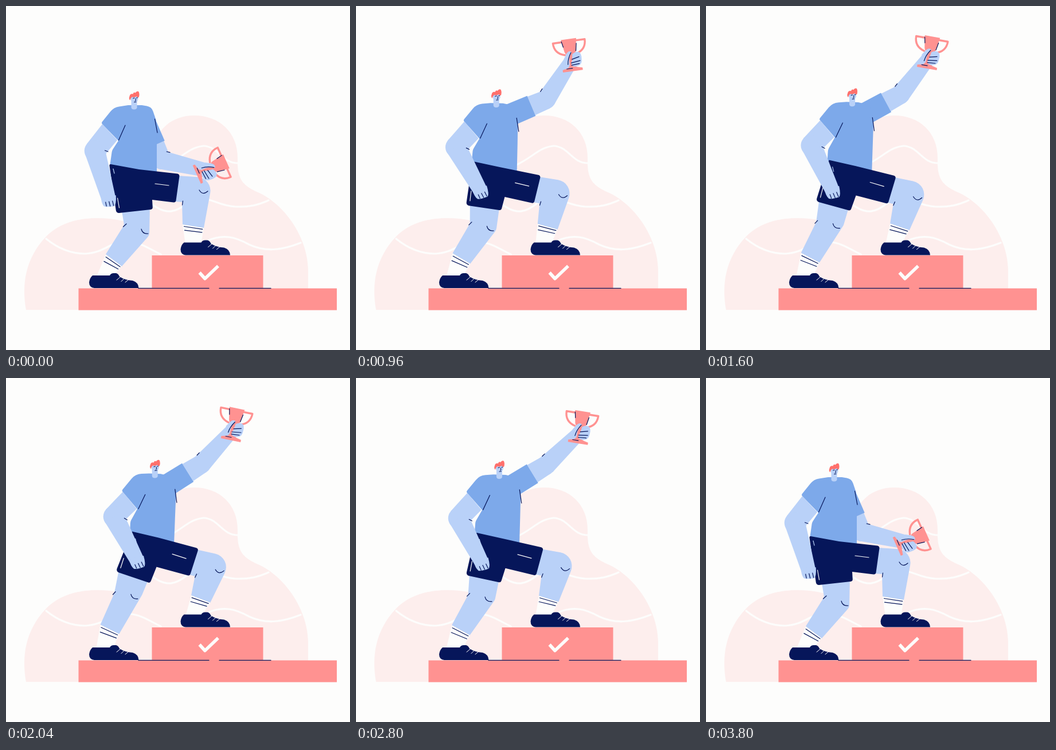
An HTML page with a canvas that plays this animation: 600 px wide and 600 px high, repeating every 3.84 s.

```html
<!DOCTYPE html>
<html lang="en">
<head>
<meta charset="utf-8">
<title>Winner</title>
<style>
html, body { margin: 0; width: 100%; height: 100%; overflow: hidden; background: #fdfdfc; }
canvas { display: block; width: 600px; height: 600px; }
</style>
</head>
<body>
<canvas id="stage" width="600" height="600"></canvas>
<script>
const ctx = document.getElementById('stage').getContext('2d');
const LOOP = 3840;
const WHITE = '#fdfdfc', BLUSH = '#fdeeed', CORAL = '#ff9291', HAIR = '#ff706c',
  NAVY = '#06165a', SKIN = '#b9d1f8', SHIRT = '#7da9ea';

// Key poses: lean 0..1, then angles in degrees
const times = [0, 560, 960, 1600, 2480, 2780, 3080, 3840];
const tracks = {
  lean:  [0, .1, .55, .82, 1, .72, .05, 0],
  upper: [66, 64, -23, -28.5, -34, -33, 67, 66],
  fore:  [13, 17.3, -57, -52.2, -44.5, -45, 15.7, 13],
  cup:   [66, 71, -8, 10, 12, 8, 73, 66],
  left:  [74, 74.6, 60.6, 65, 59, 62, 74, 74]
};

// Monotone cubic interpolation through the key poses
function sample(v, t) {
  const n = times.length;
  let i = 0;
  while (i < n - 2 && t >= times[i + 1]) i++;
  const slope = j => (v[j + 1] - v[j]) / (times[j + 1] - times[j]);
  const tangent = j => {
    if (j === 0 || j === n - 1) return 0;
    const a = slope(j - 1), b = slope(j);
    return a * b <= 0 ? 0 : 2 * a * b / (a + b);
  };
  const h = times[i + 1] - times[i], s = (t - times[i]) / h, s2 = s * s, s3 = s2 * s;
  return v[i] * (2 * s3 - 3 * s2 + 1) + v[i + 1] * (3 * s2 - 2 * s3) +
    h * (tangent(i) * (s3 - 2 * s2 + s) + tangent(i + 1) * (s3 - s2));
}

const mix = (a, b, k) => [a[0] + (b[0] - a[0]) * k, a[1] + (b[1] - a[1]) * k];
const polar = (o, deg, r) => {
  const a = deg * Math.PI / 180;
  return [o[0] + r * Math.cos(a), o[1] + r * Math.sin(a)];
};

// Polygon; a third value on a point is its corner radius
function poly(pts, color) {
  const n = pts.length;
  ctx.beginPath();
  ctx.moveTo(...mix(pts[n - 1], pts[0], .5));
  pts.forEach((p, i) => ctx.arcTo(p[0], p[1], ...mix(p, pts[(i + 1) % n], .5), p[2] || 0));
  ctx.closePath();
  ctx.fillStyle = color;
  ctx.fill();
}

function shape(d, color) {
  ctx.fillStyle = color;
  ctx.fill(new Path2D(d));
}

function stroke(d, color = NAVY, width = 1.2) {
  ctx.strokeStyle = color;
  ctx.lineWidth = width;
  ctx.stroke(new Path2D(d));
}

const line = (a, b, color, width) => stroke(`M${a}L${b}`, color, width);

function dot(c, r, color) {
  ctx.beginPath();
  ctx.arc(c[0], c[1], r, 0, 7);
  ctx.fillStyle = color;
  ctx.fill();
}

function limb(a, b, ra, rb, color) {
  const deg = Math.atan2(b[1] - a[1], b[0] - a[0]) * 180 / Math.PI;
  poly([polar(a, deg - 90, ra), polar(b, deg - 90, rb), polar(b, deg + 90, rb), polar(a, deg + 90, ra)], color);
}

function placed(x, y, deg, draw) {
  ctx.save();
  ctx.translate(x, y);
  ctx.rotate(deg * Math.PI / 180);
  draw();
  ctx.restore();
}

function backdrop() {
  ctx.fillStyle = WHITE;
  ctx.fillRect(0, 0, 600, 600);
  shape('M35 530C27 485 34 440 70 402C96 376 130 370 160 370C185 370 205 374 225 382' +
    'C245 350 244 300 254 258C260 215 290 191 328 191C372 191 404 220 404 265' +
    'C403 300 410 311 437 324C482 342 526 400 527 460V530Z', BLUSH);
  stroke('M70 406C92 424 115 432 138 432C175 430 180 410 212 411C238 413 250 424 270 433' +
    'M250 342C285 372 302 353 318 343C352 325 362 348 400 350C425 351 440 347 458 339' +
    'M280 277C308 264 320 246 345 244C372 246 376 274 405 274' +
    'M350 410C380 396 402 404 424 416C456 431 486 424 514 413', WHITE, 3.2);
}

function podium() {
  ctx.fillStyle = CORAL;
  ctx.fillRect(126.5, 492.5, 450.5, 38);
  ctx.fillRect(254.5, 435, 194, 58);
  stroke('M231 492.4H354M372 492.4H462');
  ctx.lineCap = 'butt';
  stroke('M337.5 465L347 475.5L370 453.5', WHITE, 5.6);
  ctx.lineCap = 'round';
}

function shoe(x, y) {
  placed(x, y, 0, () => {
    shape('M6 4H36Q38 0 43 0H47Q51 1 53 6Q62 12 76 13Q86 16 86.5 26H9Q0 25 0 16Q1 8 6 4Z', NAVY);
    stroke('M48 12L55 6M56 14.5L62 8.5M63 16L69 11', WHITE, 1);
  });
}

function sock(pts) {
  poly(pts, WHITE);
  const [a, b, c, d] = pts;
  for (const k of [.09, .28]) {
    const l = mix(a, d, k), r = mix(b, c, k);
    line(mix(l, r, .06), mix(l, r, .95));
  }
}

function trophy() {
  stroke('M12 -34L28 -34Q28 -16 10 -11M-12 -34L-28 -34Q-28 -16 -10 -11', CORAL, 3.4);
  shape('M-13.5 -38H13.5L10 -16Q8 -10 4 -8V7Q5 12 11 13L17.5 14.5V18.5H-17.5V14.5L-11 13Q-5 12 -4 7V-8Q-8 -10 -10 -16Z', CORAL);
  stroke('M-13 -35L-11 -25M12.4 -29L10 -16M-10 13.5H0');
}

function fist() {
  shape('M2 -15Q-2 -19 -7 -13L-13 -4L-10 7L-5 5L-3 -6Z', SKIN);
  shape('M3 -11Q10 -16 15 -13Q19 -10 18 -1Q18 8 12 10Q4 13 0 9Q-2 4 1 1Z', SKIN);
  stroke('M-7 6Q-6 -4 1 -14M1 -2L14 -5M-1 4L15 2M-1 8L13 7');
}

function head(x, y) {
  placed(x, y, 0, () => {
    shape('M-5 -12H5V4Q4 7 0 7Q-5 7 -5 3Z', SKIN);
    shape('M-6.5 -13L-4 -19H6L7 -11Q5 -4 0 -4Q-5 -5 -6.5 -13Z', SKIN);
    shape('M-7 -9Q-10 -12 -8 -16Q-7 -21 -2 -20Q-1 -24 2 -22Q5 -26 8 -24Q10 -19 8 -14Q5 -14 4 -16Q0 -13 -3 -15Q-6 -14 -7 -9Z', HAIR);
    stroke('M-2 -12.5L.5 -13M4 -13.2L6 -13.6M2.5 -12L3 -8.5L1.5 -8M0 -5.8L3.5 -6.2', NAVY, 1);
  });
}

function draw(t) {
  const pose = {};
  for (const name in tracks) pose[name] = sample(tracks[name], t);
  const p = pose.lean, q = Math.pow(Math.max(p, 0), 1.6);
  const at = (ax, ay, bx, by, r) => [...mix([ax, ay], [bx, by], p), r || 0];
  const bend = (ax, ay, bx, by, r) => [...mix([ax, ay], [bx, by], q), r || 0];
  const seg = (a, b, color) => line(a.slice(0, 2), b.slice(0, 2), color);

  ctx.lineCap = 'round';
  ctx.lineJoin = 'round';
  backdrop();
  podium();

  // Legs
  const la = at(174, 433, 164, 430), lb = at(202, 454, 197, 446);
  sock([la, lb, at(184, 474, 186, 474), [157, 474]]);
  poly([at(200, 345, 198, 328), bend(206, 382, 187, 375, 8), la, lb,
    bend(250, 400, 236, 376, 12), at(251, 345, 251, 345)], SKIN);
  const lk = bend(236, 389, 216, 376);
  stroke(`M${lk[0]} ${lk[1]}q2 9 12 8`);
  seg(bend(204.5, 385, 184.5, 377), bend(210, 380, 189, 372));

  const ra = at(308, 381, 324, 379), rb = at(345, 387, 357, 392);
  sock([ra, rb, [340, 416], [313, 416]]);
  poly([at(285, 295, 320, 296), at(361, 300, 397, 314, 24), rb, ra,
    at(307, 342, 331, 346), at(280, 340, 310, 340)], SKIN);
  const rk = at(337, 321, 367, 335);
  stroke(`M${rk[0]} ${rk[1]}q6 10 15 2`);
  seg(at(308.5, 340, 334, 342), at(307.5, 347, 331, 348));
  shoe(145, 466);
  shoe(304.5, 408.5);

  // Raised arm with the trophy
  const shoulder = at(239, 197, 277, 191).slice(0, 2);
  const hem = polar(shoulder, pose.upper, 50);
  const elbow = polar(shoulder, pose.upper, 78);
  const hand = polar(elbow, pose.fore, 81);
  limb(hem, elbow, 17.5, 16.5, SKIN);
  dot(elbow, 16.5, SKIN);
  limb(elbow, hand, 16.5, 12, SKIN);
  dot(hand, 10, SKIN);
  const inner = polar(polar(elbow, pose.fore, 9), pose.fore - 90, 16);
  line(polar(inner, pose.fore, -3), polar(inner, pose.fore, 3));
  placed(...hand, pose.cup, () => { trophy(); fist(); });
  limb(shoulder, hem, 19.5, 19, SHIRT);

  // Shirt
  poly([at(166, 204, 204, 196, 3), at(188, 177, 228, 167, 24), at(213, 173, 252, 166),
    at(237, 173, 272, 167), at(254, 176, 292, 172, 14), at(262, 200, 299, 196),
    at(263, 242, 297, 240), at(263, 292, 295, 289), at(181, 280, 218, 274),
    at(185, 252, 219, 250, 12), at(196, 235, 231, 228)], SHIRT);
  seg(at(208, 208, 245, 203), at(196.5, 234, 233, 228));
  seg(at(259.5, 197, 297, 194), at(264, 221, 300, 217));
  head(...at(223.5, 173.5, 262, 167).slice(0, 2));

  // Shorts
  poly([at(180, 275.5, 222, 267, 2), at(232, 285, 268, 278), at(303, 293, 338, 297.5, 4),
    at(296, 343, 322, 345.5, 4), at(255, 338, 263, 329), at(256, 354.5, 251, 358, 4),
    at(192.5, 361.5, 191.5, 336, 5)], NAVY);
  seg(at(260, 310, 292, 307), at(284, 313, 316, 315), WHITE);
  seg(at(187, 284, 228, 280), at(189, 292, 230, 288), SKIN);
  seg(at(194.5, 335, 206, 313), at(197.5, 352, 200, 330), WHITE);

  // Hanging arm
  const e = at(155, 252.5, 190, 241).slice(0, 2);
  const w = polar(e, pose.left, 86);
  poly([at(168, 206, 206, 198), at(194, 234, 230, 228),
    [e[0] + 13.5, e[1] + 12], [e[0] - 14, e[1] - 12]], SKIN);
  dot(e, 18.3, SKIN);
  limb(e, w, 18, 12.5, SKIN);
  placed(...w, pose.left - 74, () => {
    shape('M-13 -4Q-13 8 -8 14Q-3 16 10 14Q14 11 13 -5Z', SKIN);
    stroke('M-5 7L-3.5 14M1 6L3 14M7 5L9 13');
  });
  seg(at(172.5, 252, 208.5, 244), at(178, 254, 213.5, 247));
}

const start = performance.now();
function tick() {
  draw((performance.now() - start) % LOOP);
  requestAnimationFrame(tick);
}
tick();
</script>
</body>
</html>
```
